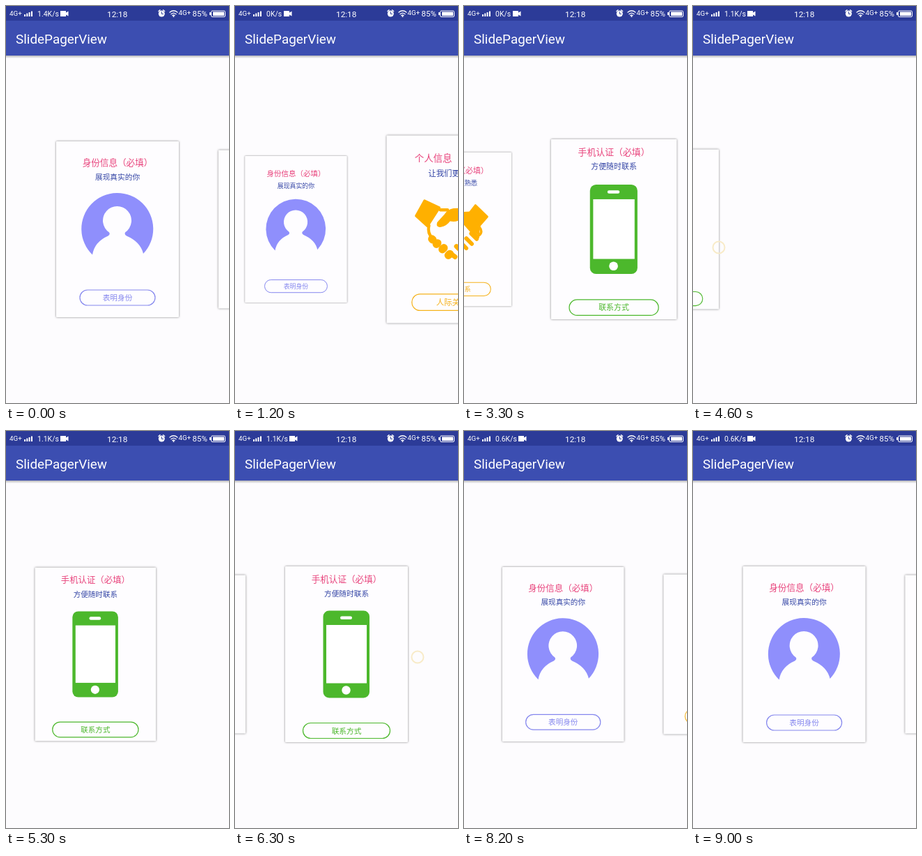
Animation, 320 px wide and 569 px high, one loop 9100 ms. Source, as an HTML page:

```html
<!DOCTYPE html>
<html lang="zh">
<head>
<meta charset="utf-8">
<style>
html, body { margin: 0; width: 100%; height: 100%; overflow: hidden; background: #fdfcfe; }
svg { display: block; width: 100vw; height: 100vh; }
text { font-family: Roboto, "Noto Sans CJK SC", "Noto Sans CJK", sans-serif; }
.card text { font-family: "Noto Sans CJK SC", "Noto Sans CJK", "Noto Sans CJK JP", sans-serif; text-anchor: middle; }
.paper { fill: #fefdff; filter: drop-shadow(0 .5px 1.5px rgba(0,0,0,.5)); }
.line { fill: none; stroke-linecap: round; stroke-linejoin: round; }
</style>
</head>
<body>
<svg viewBox="0 0 320 569" preserveAspectRatio="none">
  <defs>
    <linearGradient id="fade" x2="0" y2="1">
      <stop stop-color="#000" stop-opacity=".28"/>
      <stop offset="1" stop-color="#000" stop-opacity="0"/>
    </linearGradient>
  </defs>
  <rect width="320" height="569" fill="#fdfcfe"/>
  <g id="pager"></g>
  <circle id="touch" r="8.5" fill="none" stroke="#f8ebc8" stroke-width="2"/>
  <rect y="71" width="320" height="4" fill="url(#fade)"/>
  <rect width="320" height="71" fill="#3c4eb1"/>
  <rect width="320" height="21" fill="#2c3b98"/>
  <text x="14" y="54" font-size="18.9" fill="#fff">SlidePagerView</text>
  <g fill="#fff">
    <text x="5" y="14" font-size="9.8">4G+</text>
    <path d="M26 12h2v3h-2zM29.3 10.500h2v4.500h-2zM32.600 9h2v6h-2zM36 7.500h2v7.500h-2z"/>
    <text id="speed" x="45" y="15" font-size="10.5"></text>
    <path id="camera" d="M0 7h8v2.500l3.500-2v7l-3.500-2V15H0z"/>
    <text x="145" y="15.500" font-size="11.8">12:18</text>
    <circle cx="223.300" cy="11" r="4.500"/>
    <path class="line" d="M219 7.500l2-1.700M227.600 7.500l-2-1.700" stroke="#fff" stroke-width="1.500"/>
    <path class="line" d="M223.300 8.500V11.300H225.500" stroke="#2c3b98"/>
    <path class="line" d="M235 9q5.500-4.500 11 0M237 11.500q3.500-2.800 7 0M238.800 13.600q1.700-1.200 3.200 0" stroke="#fff" stroke-width="1.300"/>
    <circle cx="240.500" cy="15" r="1"/>
    <text x="247.500" y="13" font-size="9.8">4G+</text>
    <text x="267.500" y="15" font-size="11.500">85%</text>
    <rect x="292" y="9" width="2" height="4"/>
    <rect x="294.500" y="7" width="20" height="8.500" rx="1.500" fill="none" stroke="#fff"/>
    <rect x="297" y="8.500" width="16" height="5.500"/>
  </g>
</svg>
<script>
const LOOP = 9100, STEP = 100, CENTER = 160, GAP = 224;
const $ = id => document.getElementById(id);

const avatar = `<path fill="#8f8ffc" d="M-36 36.500A51.500 51.500 0 1 1 37 35Q33 18 13 9.500Q9.500 7.500 11 4.500
  A20.500 20.500 0 1 0 -12 4.500Q-10 7.500 -13.500 9.500Q-33 18 -36 36.500Z"/>`;

const handshake = `<g fill="#ffb000" stroke="#ffb000" stroke-linejoin="round" stroke-linecap="round">
  <path stroke-width="3" d="M-37-38.500L-17-29L-33-4L-48.500-18Z"/>
  <path stroke-width="3" d="M29-39.500L48.500-20.500L36-6L20-28Z"/>
  <path stroke-width="2" d="M21-28L2-27Q-5-26-9-20L-19-9Q-21-3-15-4Q-8-5-3-12Q5-10 10-14L34 9L36-5Z"/>
  <path class="line" stroke-width="4" d="M-16-26L-6-26M-31-5Q-33 3-29 9M35-4Q42 4 35 10"/>
  <path class="line" stroke-width="6.500" d="M12-10L32 13M22 7L31 16M14 15L23 24M6 23L14 31M-3 32L4 37"/>
  <path class="line" stroke-width="10.500" d="M-27 13L-26 14M-21 20L-19.500 18.500M-13 27L-11 25M-5 35L-3 33"/>
</g>`;

const phone = `<rect x="-33.500" y="-62.500" width="66.500" height="125" rx="8.500" fill="#4cb82c"/>
  <rect x="-29" y="-42" width="58" height="83.500" fill="#fff"/>
  <rect x="-9" y="-54.500" width="17" height="4.500" rx="2.200" fill="#fff"/>
  <circle cx="-.5" cy="51.500" r="6.200" fill="#fff"/>`;

function card({ title, sub, action, color, icon, textY, buttonY, half }) {
  return `<g class="card">
    <rect class="paper" x="-88" y="-126" width="176" height="252" rx="1"/>
    <text y="${textY}" font-size="12.600" fill="#e8437c">${title}</text>
    <text y="${textY + 19.5}" font-size="10.700" fill="#3546a6">${sub}</text>
    ${icon}
    <rect x="${-half}" y="${buttonY - 11}" width="${2 * half}" height="22" rx="11" fill="none" stroke="${color}" stroke-width="1.200"/>
    <text y="${buttonY + 4}" font-size="10.700" fill="${color}">${action}</text>
  </g>`;
}

const upper = { textY: -91, buttonY: 98, half: 54 };
$('pager').innerHTML = [
  { ...upper, title: '身份信息（必填）', sub: '展现真实的你', action: '表明身份', color: '#8587ee', icon: avatar },
  { ...upper, title: '个人信息（必填）', sub: '让我们更熟悉', action: '人际关系', color: '#f5b21c', icon: handshake },
  { title: '手机认证（必填）', sub: '方便随时联系', action: '联系方式', color: '#4cb82c', icon: phone,
    textY: -103, buttonY: 109.5, half: 62.5 }
].map(card).join('');
const cards = [...document.querySelectorAll('.card')];

// Each swipe: finger down and up times, finger path, pages, settle time.
const swipes = [
  { down: 700, up: 990, x0: 236, x1: 220, y: 345, from: 0, to: 1, settle: 2000 },
  { down: 2600, up: 2870, x0: 250, x1: 205, y: 345, from: 1, to: 2, settle: 2000 },
  { down: 4100, up: 4700, x0: 240, x1: 37, y: 346, from: 2, to: 2, settle: 2000 },
  { down: 6300, up: 6450, x0: 262, x1: 310, y: 324, from: 2, to: 1, settle: 1300 },
  { down: 7250, up: 7600, x0: 235, x1: 285, y: 330, from: 1, to: 0, settle: 1700 }
];

// Remaining share of a viscous scroll.
function remaining(t) {
  if (t >= 1) return 0;
  const x = 8 * t;
  return x < 1 ? 2 - x - Math.exp(-x) : (1 - Math.exp(-1)) * Math.exp(1 - x);
}

function pagerState(t) {
  const s = swipes.findLast(s => t >= s.down);
  if (!s) return { page: 0, offset: 0 };
  if (t < s.up) {
    const k = Math.min(1, (t - s.down) / (s.up - s.down - 100));
    const x = s.x0 + (s.x1 - s.x0) * k;
    return { page: s.from, offset: (x - s.x0) / GAP, finger: { x, y: s.y } };
  }
  const start = s.to - s.from + (s.x1 - s.x0) / GAP;
  return {
    page: s.to,
    offset: start * remaining((t - s.up) / s.settle),
    forward: s.to > s.from
  };
}

function render(t) {
  const { page, offset, finger, forward } = pagerState(t);
  cards.forEach((el, i) => {
    const p = i - page + offset;
    // While settling forward the incoming page overshoots and the rest shrink.
    const scale = forward
      ? (i === page ? 1 + 0.1 * offset : 0.9 - 0.1 * offset)
      : 1 - 0.1 * Math.min(1, Math.abs(p));
    el.setAttribute('transform', `translate(${CENTER + p * GAP} 320) scale(${scale})`);
  });

  const touch = $('touch');
  touch.style.display = finger ? '' : 'none';
  if (finger) {
    touch.setAttribute('cx', finger.x);
    touch.setAttribute('cy', finger.y);
  }

  const rate = t < 1200 ? '1.4' : t < 4200 ? '0' : t < 7300 ? '1.1' : '0.6';
  $('speed').textContent = rate + 'K/s';
  $('camera').setAttribute('transform', `translate(${rate === '0' ? 70 : 78} 0)`);
}

const begin = performance.now();
function tick() {
  const t = (performance.now() - begin) % LOOP;
  render(Math.floor(t / STEP) * STEP);
  requestAnimationFrame(tick);
}
tick();
</script>
</body>
</html>
```
